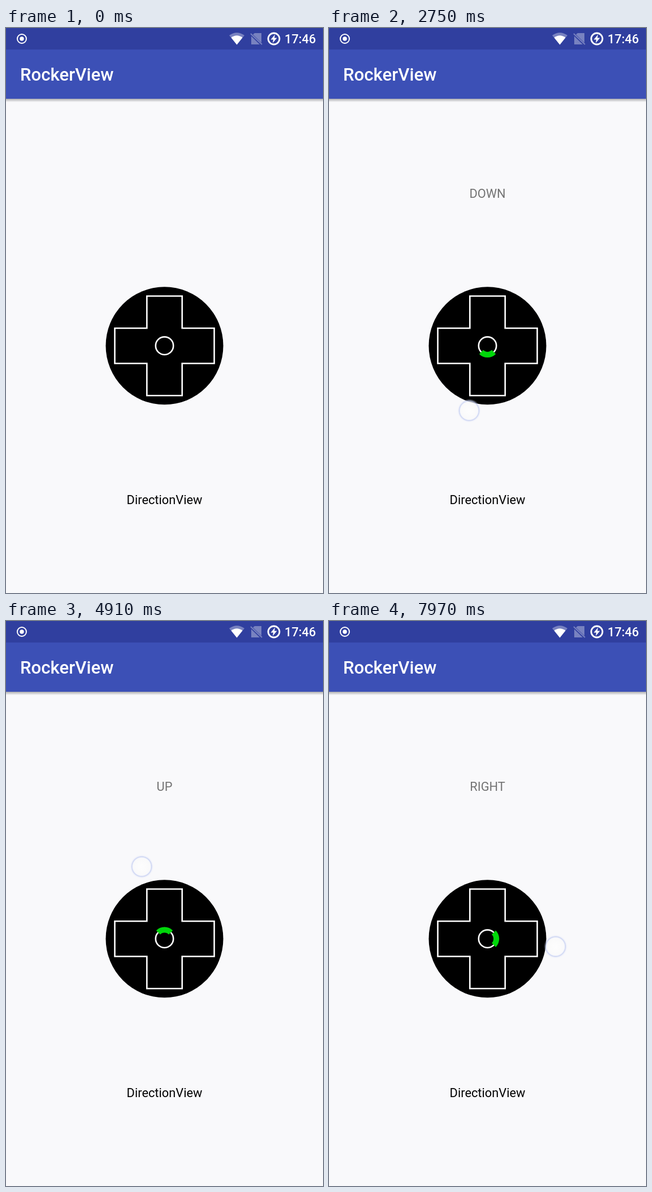
Animation of 561x998 px, one loop 7990 ms. Source, as an HTML page:

```html
<!DOCTYPE html>
<html lang="en">
<head>
<meta charset="utf-8">
<title>RockerView</title>
<style>
  html, body { margin: 0; width: 100%; height: 100%; overflow: hidden; background: #f9f9fb; }
  svg { display: block; width: 100%; height: 100%; }
  text { font-family: Roboto, sans-serif; font-size: 21.8px; }
  .medium { font-weight: 500; fill: #fff; }
  .centered { text-anchor: middle; }
  .outline { fill: none; stroke: #fff; stroke-width: 2.6; }
</style>
</head>
<body>
<svg viewBox="0 0 561 998">
  <defs>
    <linearGradient id="shade" x2="0" y2="1">
      <stop stop-color="#000" stop-opacity=".3"/>
      <stop offset="1" stop-color="#000" stop-opacity="0"/>
    </linearGradient>
    <radialGradient id="glow">
      <stop stop-color="#fff" stop-opacity=".67"/>
      <stop offset=".7" stop-color="#fafafa" stop-opacity=".72"/>
      <stop offset=".76" stop-color="#f0f2fc" stop-opacity=".74"/>
      <stop offset=".83" stop-color="#b9c5ee" stop-opacity=".75"/>
      <stop offset=".9" stop-color="#d5dbf6" stop-opacity=".3"/>
      <stop offset="1" stop-color="#e4e8fa" stop-opacity="0"/>
    </radialGradient>
  </defs>

  <rect width="561" height="998" fill="#f9f9fb"/>
  <rect y="125" width="561" height="6" fill="url(#shade)"/>
  <rect width="561" height="125" fill="#3c50b6"/>
  <rect width="561" height="38" fill="#303f9f"/>

  <!-- status bar -->
  <circle cx="28" cy="19" r="8" fill="none" stroke="#fff" stroke-width="2"/>
  <circle cx="28" cy="19" r="3.7" fill="#fff"/>
  <path d="M408.500 29.500L395 13Q408.500 3.500 422 13Z" fill="#fff" opacity=".35"/>
  <path d="M408.500 29.500L398.500 17Q408.500 9.500 418.500 17Z" fill="#fff"/>
  <g opacity=".35">
    <path d="M440 9H452V26L437 11.500ZM434 14.500L449 29H434Z" fill="#fff"/>
    <path d="M433 10L453 29" stroke="#fff" stroke-width="2"/>
  </g>
  <circle cx="474" cy="19" r="10" fill="none" stroke="#fff" stroke-width="2.8"/>
  <path d="M476 11.500L468.500 20.500H473L472 26.500L479.500 17.500H475Z" fill="#fff"/>
  <text class="medium" x="493" y="27">17:46</text>

  <text class="medium" x="25" y="93" style="font-size:31.2px">RockerView</text>
  <text id="label" class="centered" x="280.5" y="300" fill="#737373"></text>
  <text class="centered" x="280.5" y="840.5">DirectionView</text>

  <!-- direction pad -->
  <circle cx="280.5" cy="561.3" r="104"/>
  <path class="outline" d="M249.300 473.500H311.700V530.200H368.500V592.500H311.700V649.200H249.300V592.500H192.500V530.200H249.300Z"/>
  <circle class="outline" cx="280.5" cy="561.3" r="15.700"/>
  <path id="arc" fill="none" stroke="#00d70a" stroke-width="10"/>
  <circle id="touch" r="21" fill="url(#glow)"/>
</svg>
<script>
  const LOOP = 7990, PRESS = 500;
  const CX = 280.5, CY = 561.3, ARC_RADIUS = 15.7;
  const DIRECTIONS = ['RIGHT', 'DOWN_AND_RIGHT', 'DOWN', 'DOWN_AND_LEFT',
                      'LEFT', 'UP_AND_LEFT', 'UP', 'UP_AND_RIGHT'];

  // Finger path around the pad: time in ms, clockwise angle in degrees, distance.
  const PATH = [
    [500, 10, 71], [1130, 20.6, 76.5], [1990, 54.9, 96.3], [2150, 62, 104],
    [2560, 90, 117], [2910, 119, 121], [3010, 124, 125], [3590, 176.2, 132.3],
    [3890, 185, 133.5], [4770, 245.4, 134], [4910, 252.4, 133.7], [5630, 287, 128],
    [6210, 310.3, 122.4], [6410, 316, 121], [7390, 343.6, 117], [7970, 366.5, 121.3],
    [7990, 367.2, 121.5]
  ];

  const label = document.getElementById('label');
  const arc = document.getElementById('arc');
  const touch = document.getElementById('touch');

  function polar(degrees, radius) {
    const a = degrees * Math.PI / 180;
    return [CX + radius * Math.cos(a), CY + radius * Math.sin(a)];
  }

  function fingerAt(t) {
    const i = PATH.findIndex(key => key[0] > t);
    const from = PATH[i - 1], to = PATH[i];
    const k = (t - from[0]) / (to[0] - from[0]);
    return [1, 2].map(n => from[n] + (to[n] - from[n]) * k);
  }

  function render(t) {
    const pressed = t >= PRESS;
    arc.style.display = touch.style.display = pressed ? '' : 'none';
    if (!pressed) {
      label.textContent = '';
      return;
    }
    const [angle, distance] = fingerAt(t);
    const sector = Math.round(angle / 45) % 8;
    const start = polar(sector * 45 - 45, ARC_RADIUS);
    const end = polar(sector * 45 + 45, ARC_RADIUS);
    const [x, y] = polar(angle, distance);
    label.textContent = DIRECTIONS[sector];
    arc.setAttribute('d', `M${start}A${ARC_RADIUS} ${ARC_RADIUS} 0 0 1 ${end}`);
    touch.setAttribute('cx', x);
    touch.setAttribute('cy', y);
  }

  const startTime = performance.now();
  function tick() {
    render((performance.now() - startTime) % LOOP);
    requestAnimationFrame(tick);
  }
  tick();
</script>
</body>
</html>
```
